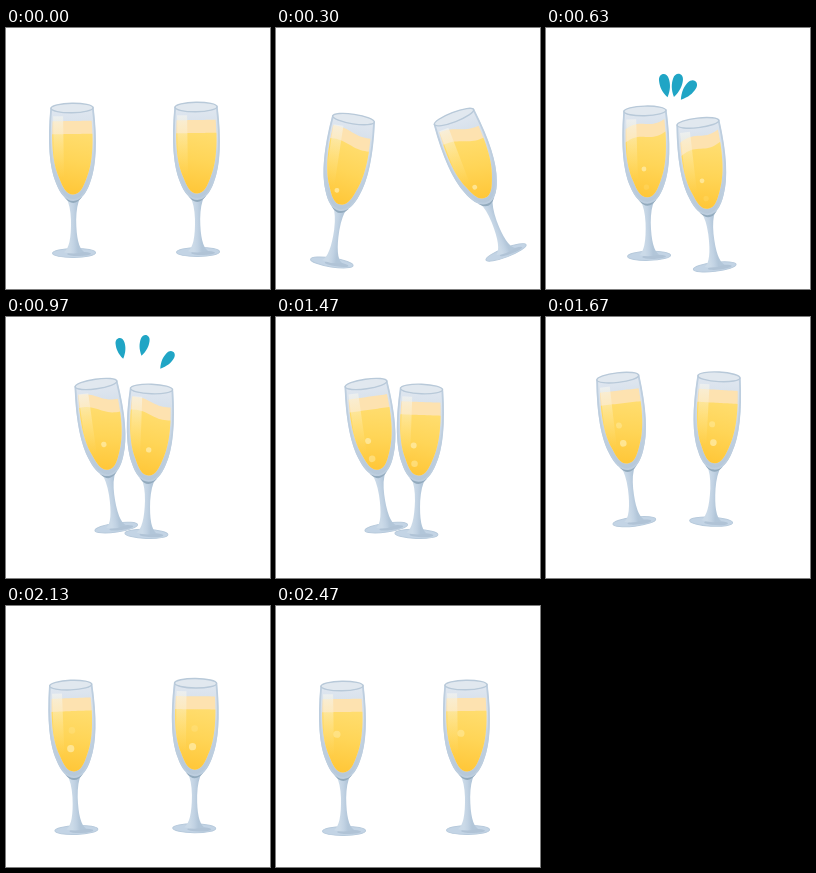
Write an HTML page with a canvas that moves like this. It is 264 px wide and 261 px high and loops after 2.5 s.

```html
<!DOCTYPE html>
<html>
<head>
<meta charset="utf-8">
<title>Cheers</title>
<style>
html, body { margin: 0; width: 100%; height: 100%; overflow: hidden; background: #fff; }
canvas { display: block; width: 264px; height: 261px; }
</style>
</head>
<body>
<canvas id="stage" width="264" height="261"></canvas>
<script>
const ctx = document.getElementById('stage').getContext('2d');
const LOOP = 2500;

const clamp = v => Math.min(1, Math.max(0, v));
const mix = (a, b, u) => a + (b - a) * u;
const easeIn = u => u * u;
const easeOut = u => Math.sin(u * Math.PI / 2);
const smooth = u => u * u * (3 - 2 * u);

const glass = (x, y, angle) => ({ x, y, angle });
const rest = [glass(66, 80, -.014), glass(190, 79, -.014)];
const swing = [glass(77.5, 91, .15), glass(178, 89, -.367)];
const clink = [glass(99, 83, -.028), glass(152, 95, -.117)];
const together = [glass(90, 67, -.14), glass(145.5, 72, .035)];
const back = [glass(61.5, 77, -.1), glass(188.5, 73, .065)];

// A positive dip sinks the glasses halfway through the move, a negative one lifts them.
const moves = [
  { start: 30, end: 300, pose: swing, ease: smooth, dip: 0 },
  { start: 300, end: 630, pose: clink, ease: easeIn, dip: 8 },
  { start: 630, end: 860, pose: together, ease: easeOut, dip: 0 },
  { start: 1490, end: 1900, pose: back, ease: easeOut, dip: -13 },
  { start: 1900, end: 2260, pose: rest, ease: smooth, dip: 0 }
];

function poseAt(t, side) {
  let now = rest[side];
  for (const { start, end, pose, ease, dip } of moves) {
    const u = clamp((t - start) / (end - start)), e = ease(u), next = pose[side];
    now = glass(
      mix(now.x, next.x, e),
      mix(now.y, next.y, e) + dip * Math.sin(Math.PI * u),
      mix(now.angle, next.angle, e));
  }
  return now;
}

function slosh(t) {
  return .27 * Math.sin(Math.PI * clamp(t / 1350)) * Math.cos(2 * Math.PI * (t - 300) / 670);
}

function ellipse(x, y, rx, ry, fill, stroke, width = 1) {
  ctx.beginPath();
  ctx.ellipse(x, y, rx, ry, 0, 0, Math.PI * 2);
  if (fill) { ctx.fillStyle = fill; ctx.fill(); }
  if (stroke) { ctx.strokeStyle = stroke; ctx.lineWidth = width; ctx.stroke(); }
}

function gradient(x0, y0, x1, y1, ...colors) {
  const g = ctx.createLinearGradient(x0, y0, x1, y1);
  colors.forEach((c, i) => g.addColorStop(i / (colors.length - 1), c));
  return g;
}

function bowl(inset, bottom) {
  const w = 21.5 - inset, s = bottom / 93;
  ctx.beginPath();
  ctx.moveTo(-w, 0);
  ctx.bezierCurveTo(-w - 2.5, 25 * s, -w - 3.5, 55 * s, -w + 4.5, 75 * s);
  ctx.bezierCurveTo(-w + 8, 85 * s, -7, bottom, 0, bottom);
  ctx.bezierCurveTo(7, bottom, w - 8, 85 * s, w - 4.5, 75 * s);
  ctx.bezierCurveTo(w + 3.5, 55 * s, w + 2.5, 25 * s, w, 0);
  ctx.closePath();
}

function stem() {
  ellipse(0, 145, 21.5, 4.5, '#c3d4e5', '#b7cadc');
  ellipse(5, 146, 12, 2.2, '#b0c3d6');
  ctx.beginPath();
  ctx.moveTo(-7, 90);
  ctx.quadraticCurveTo(-3, 97, -2.6, 112);
  ctx.quadraticCurveTo(-2.4, 139, -10, 144);
  ctx.quadraticCurveTo(0, 147, 10, 144);
  ctx.quadraticCurveTo(2.4, 139, 2.6, 112);
  ctx.quadraticCurveTo(3, 97, 7, 90);
  ctx.fillStyle = gradient(-4, 0, 4, 0, '#cbdae8', '#c1d2e3', '#b2c6d9');
  ctx.fill();
}

function liquid(level, tilt, fill) {
  ctx.beginPath();
  ctx.moveTo(-26, 95);
  for (let x = -26; x <= 26; x += 2) {
    ctx.lineTo(x, level + tilt * x + Math.abs(tilt) * 9 * Math.sin(x / 7));
  }
  ctx.lineTo(26, 95);
  ctx.fillStyle = fill;
  ctx.fill();
}

function bubbles(t) {
  const life = 760;
  for (let i = 0; i < 5; i++) {
    const age = t - 210 - i * 405;
    if (age < 0 || age > life) continue;
    const radius = 2.4 + .3 * i;
    ctx.globalAlpha = .75 * clamp(age / 70) * clamp((life - age) / 180);
    ellipse(-3 - 3 * Math.cos(i * 2.4 + age / 250), 77 - age * .045, radius, radius, '#ffedaa');
  }
  ctx.globalAlpha = 1;
}

function drawGlass(t, side) {
  const { x, y, angle } = poseAt(t, side), tilt = slosh(t);
  ctx.save();
  ctx.translate(x, y);
  ctx.rotate(angle);
  stem();

  bowl(0, 93);
  ctx.fillStyle = gradient(0, 0, 0, 93, '#e0e7f0', '#d0dce8', '#bfcfdf', '#b6c8d9');
  ctx.fill();
  ctx.fillStyle = '#92aabd';
  ctx.beginPath();
  ctx.moveTo(-9, 89);
  ctx.quadraticCurveTo(0, 95, 9, 89);
  ctx.quadraticCurveTo(0, 101, -9, 89);
  ctx.fill();

  ctx.save();
  bowl(3.2, 86.5);
  ctx.clip();
  liquid(13, tilt, '#fde2b0');
  liquid(26, tilt, gradient(8, 20, -6, 87, '#ffde72', '#ffd557', '#ffc637'));
  ctx.fillStyle = gradient(0, 8, 0, 70, 'rgba(245,245,240,.65)', 'rgba(255,240,190,.3)', 'rgba(255,230,140,0)');
  ctx.fillRect(-19, 8, 10, 62);
  bubbles(t);
  ctx.restore();

  bowl(.7, 92);
  ctx.strokeStyle = '#bdcedf';
  ctx.lineWidth = 1.8;
  ctx.stroke();
  ellipse(0, 0, 21, 4.8, '#e1e8ef', '#b8c9d9', 1.4);
  ctx.restore();
}

function drawDrops(t) {
  const end = 1180;
  if (t < 585 || t > end) return;
  const u = clamp((t - 610) / 360);
  const size = Math.min(1, (t - 575) / 50, (end - t) / 150) * mix(1.12, 1, u);
  const spread = easeOut(u);
  ctx.fillStyle = '#20a5c5';
  for (const i of [-1, 0, 1]) {
    ctx.save();
    ctx.translate(
      mix(130 + 10.5 * i, 138 + 23 * i, spread),
      mix(60 + 2 * i + 2 * i * i, 28 + 6 * i + 9 * i * i, spread));
    ctx.rotate(.23 + .43 * i);
    ctx.scale(size, size);
    ctx.beginPath();
    ctx.moveTo(0, 11);
    ctx.bezierCurveTo(-4, 5, -5, 0, -4.5, -5);
    ctx.bezierCurveTo(-4, -12, 4, -12, 4.5, -5);
    ctx.bezierCurveTo(5, 0, 4, 5, 0, 11);
    ctx.fill();
    ctx.restore();
  }
}

const origin = performance.now();
function tick() {
  const t = (performance.now() - origin) % LOOP;
  ctx.fillStyle = '#fff';
  ctx.fillRect(0, 0, 264, 261);
  drawGlass(t, 0);
  drawGlass(t, 1);
  drawDrops(t);
  requestAnimationFrame(tick);
}
tick();
</script>
</body>
</html>
```
